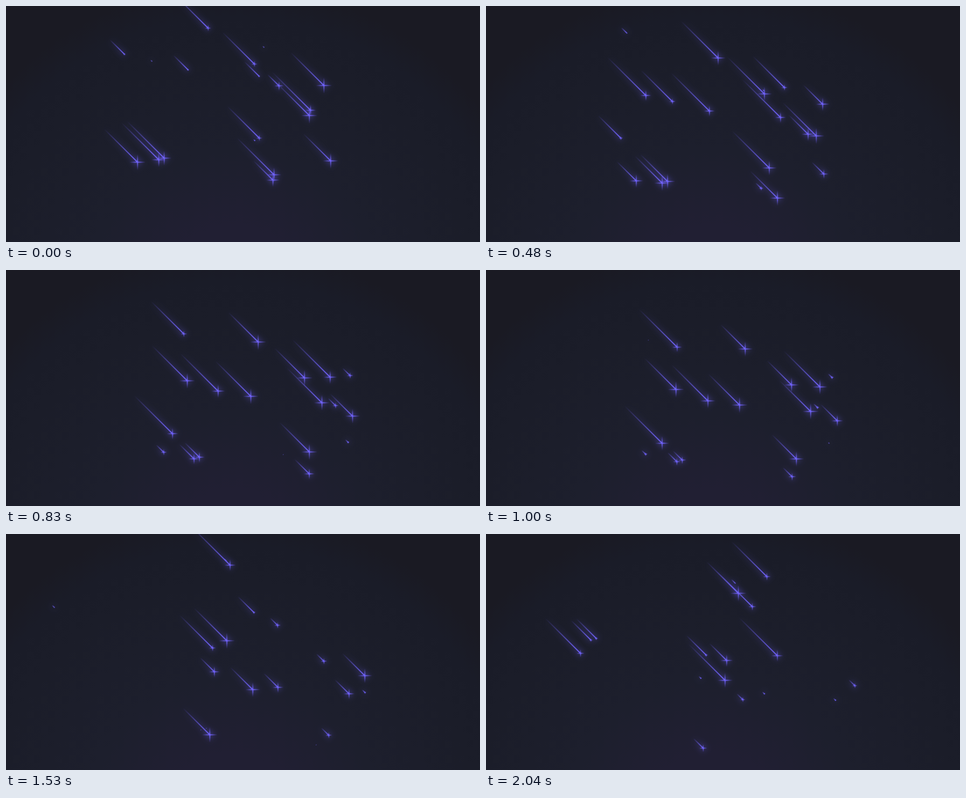
Write an HTML page that moves like this. It is 880 px wide and 440 px high and loops after 2.08 s.

```html
<!DOCTYPE html>
<html lang="en">
<head>
<meta charset="utf-8">
<title>Shooting stars</title>
<style>
  html, body { margin: 0; width: 100%; height: 100%; overflow: hidden; background: #1a1a23; }
  #sky {
    position: relative; width: 880px; height: 440px; overflow: hidden;
    background: radial-gradient(circle at 421px 540px,
      #211f33 130px, #1d1f2d 270px, #1b1d29 450px, #1a1c28 520px, #1a1a23 580px);
  }
  .star {
    --core: #7264ff; --clear: rgba(0, 0, 255, 0);
    position: absolute; height: 2px; border-radius: 999px; transform-origin: 0 50%;
    background: linear-gradient(-45deg, var(--core), var(--clear));
    filter: drop-shadow(0 0 6px var(--core));
  }
  .star::before, .star::after {
    content: ""; position: absolute; top: 0; right: 0;
    width: var(--shine); height: 2px; border-radius: 100%;
    background: linear-gradient(-45deg, var(--clear), var(--core), var(--clear));
    transform: translateX(50%) rotate(45deg);
  }
  .star::after { transform: translateX(50%) rotate(-45deg); }
</style>
</head>
<body>
<div id="sky"></div>
<script>
const LOOP = 2080, FLIGHT = 2670;
const TRAVEL = 303, TAIL = 100, SHINE = 30;

// Stars fly in evenly spaced volleys; each point is where a star sets out.
const VOLLEYS = [
  [[268, 100], [476, 74]],
  [[186, 56], [436, 97], [304, 85]],
  [[296, -38], [391, 167], [382, 29]],
  [[454, 83]],
  [[362, 179], [148, 151], [158, 148]],
  [[431, -11], [404, 45], [85, 132]],
  [[423, 109]],
  [[301, 130]],
  [[303, -55]],
  [],
  [[249, 38]],
  [[197, 193]]
];
const volleyPhase = k => .043 + .0865 * k;

// cubic-bezier(.42, 0, .58, 1)
function ease(x) {
  let u = x;
  for (let i = 0; i < 5; i++) {
    u -= (((.52 * u - .78) * u + 1.26) * u - x) / ((1.56 * u - 1.56) * u + 1.26);
  }
  return u * u * (3 - 2 * u);
}

// rises from 0 to 1 at the peak, then falls back to 0
const swell = (p, peak) => p < peak ? ease(p / peak) : 1 - ease((p - peak) / (1 - peak));

// steady flight with one brief hitch, soon caught up
const hitch = t => 50 * Math.max(0, 1 - Math.abs(t - 320) / 340);
const progress = t => (t - hitch(t)) / FLIGHT;

const sky = document.getElementById("sky");

function addStar([x, y], phase) {
  const el = document.createElement("div");
  el.className = "star";
  el.style.left = x + "px";
  el.style.top = y - 1 + "px";
  sky.append(el);
  return { style: el.style, phase };
}

const stars = VOLLEYS.flatMap((starts, k) => starts.map(start => addStar(start, volleyPhase(k))));

function draw(t) {
  for (const { style, phase } of stars) {
    const p = (phase + progress(t)) % 1;
    style.width = TAIL * swell(p, .3) + "px";
    style.transform = `rotate(45deg) translateX(${TRAVEL * ease(p)}px)`;
    style.setProperty("--shine", SHINE * swell(p, .5) + "px");
  }
}

const begin = performance.now();
function tick() {
  draw((performance.now() - begin) % LOOP);
  requestAnimationFrame(tick);
}
tick();
</script>
</body>
</html>
```
